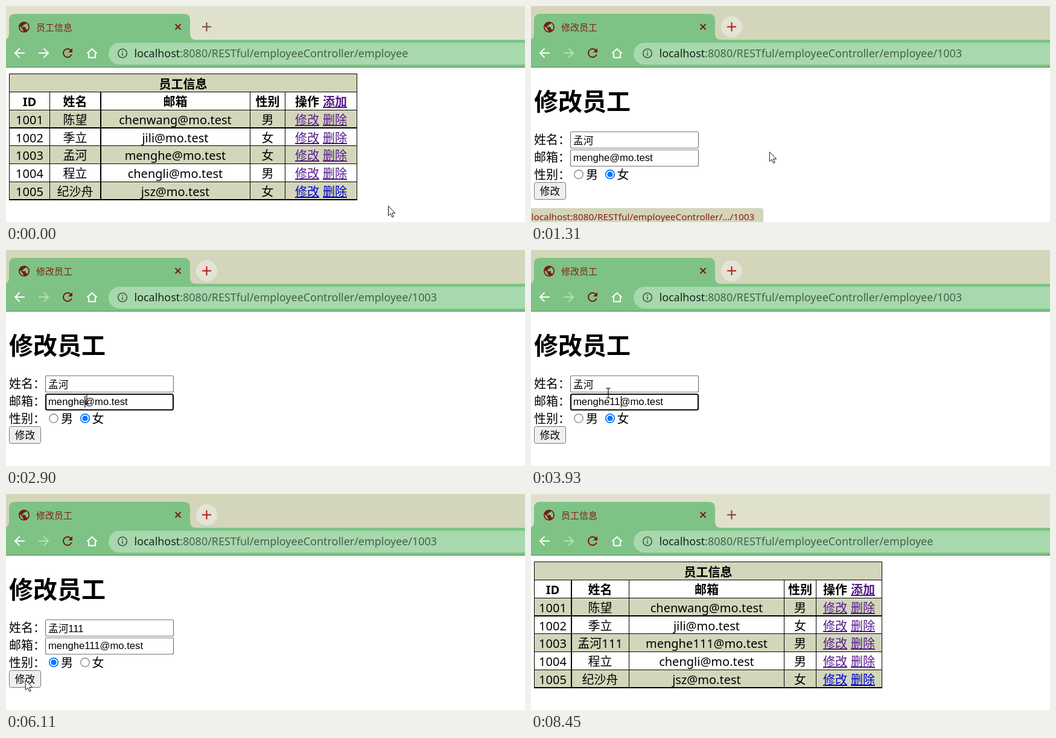
Recreate the animation shown at these times as an HTML page. Size 860 by 358 pixels, loop 8.52 s.

```html
<!DOCTYPE html>
<html lang="zh-CN">
<head>
<meta charset="utf-8">
<title>员工信息</title>
<style>
  html, body { margin: 0; width: 100%; height: 100%; overflow: hidden; background: #fff; }
  svg { display: block; width: 860px; height: 358px; font: 20px "Noto Sans", "Noto Sans CJK SC", sans-serif; }
  .bold { font-weight: 700; }
  .mid { text-anchor: middle; }
  .link { fill: #551a8b; text-decoration: underline; text-decoration-skip-ink: none; }
  .new { fill: #0000cc; }
  .input { font: 16.67px "Liberation Sans", "Noto Sans CJK SC", sans-serif; }
  .line { fill: none; stroke-width: 2; }
  .red { stroke: #7d1712; }
  .white { stroke: #fff; }
</style>
</head>
<body>
<svg viewBox="0 0 860 358">
  <g id="page"></g>

  <g id="form">
    <text x="5" y="173" class="bold" font-size="40">修改员工</text>
    <text x="5" y="229">姓名：</text>
    <text x="5" y="258">邮箱：</text>
    <text x="5" y="287">性别：</text>
    <rect id="nameBox" fill="#fff"/>
    <rect id="mailBox" fill="#fff"/>
    <text id="name" class="input" x="70" y="229"></text>
    <text id="mail" class="input" x="70" y="257"></text>
    <rect id="caret" width="1.25" height="19"/>
    <g id="male"></g><text x="91" y="287">男</text>
    <g id="female"></g><text x="142.5" y="287">女</text>
    <rect id="button" x="5.5" y="292.5" width="52" height="28" rx="3"/>
    <text class="input mid" x="31.5" y="313">修改</text>
  </g>

  <rect id="strip" width="860" height="57"/>
  <path d="M-5 56Q5 56 5 46V23Q5 13 15 13H295Q305 13 305 23V46Q305 56 315 56Z" fill="#7ec385"/>
  <rect y="56" width="860" height="45" fill="#7ec385"/>
  <rect y="101" width="860" height="1" fill="#5b7560"/>
  <rect x="170" y="61" width="720" height="36" rx="18" fill="#a8d8ad"/>

  <path id="globe" transform="translate(19.2 24.2) scale(.9)" fill="#7d1712" d="M12 2C6.48 2 2 6.48 2 12s4.48 10 10 10 10-4.48 10-10S17.52 2 12 2zm-1 17.93c-3.95-.49-7-3.85-7-7.93 0-.62.08-1.21.21-1.79L9 15v1c0 1.1.9 2 2 2v1.93zm6.9-2.54c-.26-.81-1-1.39-1.9-1.39h-1v-3c0-.55-.45-1-1-1H8v-2h2c.55 0 1-.45 1-1V7h2c1.1 0 2-.9 2-2v-.41c2.93 1.19 5 4.06 5 7.41 0 2.08-.8 3.97-2.1 5.39z"/>
  <g id="spinner">
    <circle cx="30" cy="35" r="9" fill="none" stroke="#73b488" stroke-width="1.5"/>
    <path d="M30 26A9 9 0 0 0 24 42" fill="none" stroke="#3f8f83" stroke-width="1.5"/>
  </g>
  <text id="title" x="50" y="40.5" font-size="15" fill="#861e16"></text>
  <path class="line red" d="M280.500 30L289.500 39M289.500 30L280.500 39"/>
  <circle id="plusDisc" cx="332.5" cy="34.5" r="17.5" fill="#e3e4d6"/>
  <path id="plus" class="line" d="M325 34.500H340M332.500 27V42"/>

  <path class="line white" d="M31 78H15.500M22.500 70.500L15 78L22.500 85.500"/>
  <path id="forward" class="line white" d="M54 78H69.500M62.500 70.500L70 78L62.500 85.500"/>
  <path id="reload" transform="translate(90 66)" fill="#7d1712" d="M17.650 6.350A8 8 0 1 0 19.730 14H17.650A6 6 0 1 1 16.220 7.780L13 11H20V4Z"/>
  <path id="stop" class="line red" d="M95.500 71L109.500 85M109.500 71L95.500 85"/>
  <path class="line white" d="M134.500 78.500L142.500 71L150.500 78.500M137 77V85.500H148V77"/>
  <g stroke="#42594a" fill="none" stroke-width="1.6">
    <circle cx="193" cy="78.5" r="7.3"/><path d="M193 77.500V82.500M193 74.200V75.900"/>
  </g>
  <text x="212.5" y="84.5" font-size="17.95" fill="#44604c"><tspan fill="#17241a">localhost</tspan>:8080/RESTful/employeeController/employee<tspan id="urlId">/1003</tspan></text>

  <g id="status">
    <path d="M0 335H381Q385 335 385 339V358H0Z" fill="#d3d6ba"/>
    <text x="0.5" y="354.5" font-size="15.3" fill="#8b1a10">localhost:8080/RESTful/employeeController/.../1003</text>
  </g>

  <g id="pointer">
    <circle id="halo" r="16" fill="#e4d91c" opacity=".7"/>
    <path id="arrow" d="M.5.5V16.500L4.200 13L6.800 19L9.300 18L6.700 12.200H11.800Z" fill="#fff" stroke="#111"/>
    <path id="beam" d="M-3.500-8H-1Q0-8 0-7Q0-8 1-8H3.500M0-7V7M-3.500 8H-1Q0 8 0 7Q0 8 1 8H3.500" fill="none" stroke="#111" stroke-width="1.2"/>
    <path id="hand" d="M-1.500 13V2Q0-1 1.500 2V8Q3.500 6 4.500 8.500Q6.500 7 7.500 9.500Q10 8.500 10 11.500V16Q10 19 8 21V23.500H-.5V21.500L-5.500 14Q-5 10.500-1.500 14Z" fill="#fff" stroke="#111"/>
  </g>
</svg>
<script>
const LOOP = 8520;
const $ = id => document.getElementById(id);
const show = (id, on) => $(id).setAttribute('visibility', on ? 'inherit' : 'hidden');
const set = (id, attrs) => { for (const k in attrs) $(id).setAttribute(k, attrs[k]); };
const put = (id, text) => { if ($(id).textContent !== text) $(id).textContent = text; };
const within = (v, a, b) => v >= a && v < b;

const HOST = '@mo.test';
const staff = [
  ['陈望', 'chenwang', '男'], ['季立', 'jili', '女'], ['孟河', 'menghe', '女'],
  ['程立', 'chengli', '男'], ['纪沙舟', 'jsz', '女']
];
const rows = [112, 142, 172, 201, 231, 261, 291, 320];

// Employee table; cols are the x positions of the vertical rules
function table(cols, opsX, thickX, edited) {
  const text = (x, row, s, cls = '') =>
    `<text x="${x}" y="${Math.round(136.5 + row * 29.7)}" class="${cls}">${s}</text>`;
  const rule = (x, y, w, h) => `<rect x="${x}" y="${y}" width="${w}" height="${h}"/>`;
  const mid = i => (cols[i] + cols[i + 1] + 1) / 2;
  let out = '';
  for (const i of [0, 2, 4, 6])
    out += `<rect x="5" y="${rows[i]}" width="577" height="${rows[i + 1] - rows[i]}" fill="#d3d6ba"/>`;
  rows.forEach((y, i) => out += rule(5, y, 577, i === 3 || i === 7 ? 2 : 1));
  cols.forEach((x, i) => {
    const top = i === 0 || i === 5 ? 112 : 142;
    out += rule(x, top, x === thickX ? 2 : 1, 322 - top);
  });
  out += text(293.5, 0, '员工信息', 'bold mid');
  ['ID', '姓名', '邮箱', '性别'].forEach((s, i) => out += text(mid(i), 1, s, 'bold mid'));
  out += text(opsX, 1, '操作', 'bold') + text(opsX + 46, 1, '添加', 'bold link');
  staff.forEach(([name, user, sex], i) => {
    const changed = edited && i === 2, tail = changed ? '111' : '', row = i + 2;
    [1001 + i, name + tail, user + tail + HOST, changed ? '男' : sex]
      .forEach((s, c) => out += text(mid(c), row, s, 'mid'));
    const cls = i === 4 ? 'link new' : 'link';
    out += text(opsX, row, '修改', cls) + text(opsX + 46, row, '删除', cls);
  });
  return out;
}
$('page').innerHTML =
  `<g id="before">${table([5, 72, 156, 404, 462, 581], 479, 156)}</g>` +
  `<g id="after">${table([5, 66, 162, 419, 472, 581], 484, 66, true)}</g>`;

const T = { active: 1030, form: 1240, mailFocus: 2490, nameFocus: 4270, blur: 5640, submit: 6600, done: 7420, idle: 8450 };
const mailKeys = [3450, 3930, 4060];
const nameKeys = [4890, 5110, 5300];
const clicks = [[950, 1100], [2490, 2640], [4200, 4340], [5440, 5640], [6320, 6520]];

// Pointer: time, x, y
const path = [
  [0, 633, 331], [70, 633, 331], [700, 489, 242], [1170, 489, 242], [1580, 215, 240],
  [1650, 183, 233], [1790, 178, 230], [1860, 166, 229.5], [2060, 166, 229.5],
  [2270, 134, 247], [2900, 134, 247], [3050, 127, 293], [3310, 125, 268],
  [3660, 128, 240], [3860, 128, 240], [4200, 128, 226], [4680, 128, 226],
  [4960, 127, 258], [5400, 82, 282], [5640, 82, 282], [6250, 17, 316],
  [6600, 17, 316], [7140, 86, 328], [7350, 100, 337], [7420, 100, 337],
  [7900, 820, 362], [LOOP, 820, 362]
];
function pointerAt(t) {
  const i = path.findIndex(k => k[0] > t);
  const [t0, x0, y0] = path[i - 1], [t1, x1, y1] = path[i];
  const p = (t - t0) / (t1 - t0);
  return [x0 + (x1 - x0) * p, y0 + (y1 - y0) * p];
}

function field(id, y, focused, hover) {
  set(id, focused
    ? { x: 66, y: y + 1, width: 211, height: 26, rx: 2.5, stroke: '#101010', 'stroke-width': 2.2 }
    : { x: 65.5, y: y + .5, width: 212, height: 27, rx: 2, stroke: hover ? '#3c3c3c' : '#767676', 'stroke-width': 1.2 });
}
function radio(id, x, on) {
  const html = `<circle cx="${x}" cy="279" r="7.2" fill="#fff" stroke="${on ? '#0075ff' : '#767676'}" stroke-width="${on ? 1.7 : 1.2}"/>` +
    (on ? `<circle cx="${x}" cy="279" r="4.6" fill="#0075ff"/>` : '');
  if ($(id).dataset.on !== String(on)) { $(id).innerHTML = html; $(id).dataset.on = on; }
}

function render(t) {
  const form = within(t, T.form, T.done);
  const active = within(t, T.active, T.idle);
  const loading = within(t, T.submit, T.done);
  const [x, y] = pointerAt(t);

  show('before', t < T.form);
  show('after', t >= T.done);
  show('form', form);
  show('urlId', form);
  put('title', form ? '修改员工' : '员工信息');
  set('strip', { fill: active ? '#d3d6ba' : '#dfe1cd' });
  show('plusDisc', active);
  set('plus', { stroke: active ? '#b3161a' : t < T.form ? '#7a4a38' : '#8c3d33' });
  set('forward', { opacity: t < T.form ? 1 : .45 });
  show('globe', !loading);
  show('reload', !loading);
  show('spinner', loading);
  show('stop', loading);
  set('spinner', { transform: `rotate(${(t - 7140) * .2} 30 35)` });

  const inName = within(x, 65, 278) && within(y, 208, 237);
  const inMail = within(x, 65, 278) && within(y, 237, 266);
  const mailOn = within(t, T.mailFocus, T.nameFocus);
  const nameOn = within(t, T.nameFocus, T.blur);
  const typed = keys => keys.filter(k => k <= t).length;
  const m = typed(mailKeys), n = typed(nameKeys);
  field('nameBox', 208, nameOn, inName);
  field('mailBox', 238, mailOn, inMail);
  put('name', '孟河' + '1'.repeat(n));
  put('mail', 'menghe' + '1'.repeat(m) + HOST);
  radio('male', 79, t >= T.blur);
  radio('female', 131, t < T.blur);
  const pressed = within(t, 6200, T.done);
  set('button', { fill: pressed ? '#e3e3e3' : '#efefef', stroke: pressed ? '#4a4a4a' : '#767676' });

  const last = Math.max(...[T.mailFocus, T.nameFocus, ...mailKeys, ...nameKeys].filter(k => k <= t));
  show('caret', (mailOn || nameOn) && (t - last) % 1060 < 530);
  set('caret', nameOn ? { x: 103.3 + n * 9.27, y: 213.5 } : { x: 130.3 + m * 9.27, y: 242 });

  set('status', { opacity: t < 630 ? 0 : t < 1570 ? 1 : Math.max(0, 1 - (t - 1570) / 115) });

  const hand = t < T.form && within(x, 479, 566) && y < 258;
  const beam = form && (inName || inMail);
  set('pointer', { transform: `translate(${x} ${y})` });
  show('hand', hand);
  show('beam', beam);
  show('arrow', !hand && !beam);
  show('halo', clicks.some(([a, b]) => within(t, a, b)));
}

const start = performance.now();
function tick() {
  render((performance.now() - start) % LOOP);
  requestAnimationFrame(tick);
}
tick();
</script>
</body>
</html>
```
